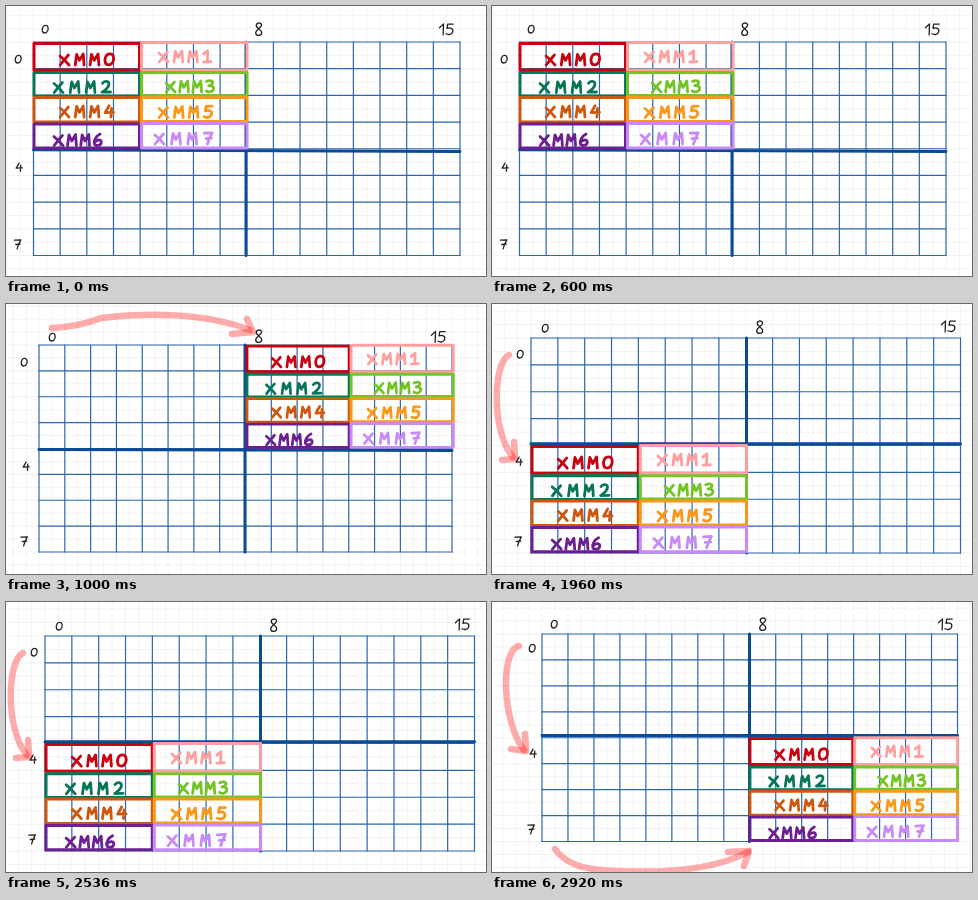
These frames come from a looping animation (480 px wide and 270 px high, 3.88 s). An HTML page with a canvas:

```html
<!DOCTYPE html>
<html lang="en">
<head>
<meta charset="utf-8">
<title>Register tiles on a 16 by 8 grid</title>
<style>
html, body { margin: 0; width: 100%; height: 100%; overflow: hidden; background: #fff; }
canvas { display: block; width: 480px; height: 270px; }
</style>
</head>
<body>
<canvas id="stage" width="480" height="270" role="img" aria-label="Registers XMM0 to XMM7 covering each quarter of a 16 by 8 grid"></canvas>
<script>
const ctx = document.getElementById('stage').getContext('2d');
const LOOP = 3880;
const CELL = 26.65;

// Pen strokes, each in a box about 9 wide and 12 high; I is a 1 without a foot
const GLYPHS = {
  x: 'M0 3 Q4.5 6.5 9 12 M8.4 2 Q4 7 0.2 12',
  M: 'M0.4 12 L1.8 1.4 L4.6 7.4 L8.4 1 L9.2 12',
  0: 'M5.5 0.8 C1.5 0.8 0 5 0.6 8.5 C1.2 13 6.5 13 8.5 8.5 C10 4.5 8.8 0.8 5.5 0.8',
  1: 'M1 4 L5.2 0.8 L4.8 11.6 M1.2 12 L8.6 11.6',
  I: 'M1.2 4.6 L5.6 0.4 L5.2 12.4',
  2: 'M1 2.8 C2.5 0 8 0 7.4 4 C7 7 4 9.5 0.6 11.7 L9 11.5',
  3: 'M1 1.4 C4 0 8 0.6 7 3.2 C6.4 4.8 4.5 5.4 3.2 5.6 C7 5.4 9 7.5 7.6 10 C6.2 12.4 3 12.4 0.8 11',
  4: 'M4.6 0.6 L0.6 7.6 L9 7.3 M7 3.4 L6.4 12',
  5: 'M8.6 0.6 L2.6 0.8 L1.8 5.4 C5.2 4 8.8 5.4 8 8.8 C7.2 12.2 3.4 12.6 0.6 11.2',
  6: 'M6.6 0.6 C2.6 2.6 0 7 0.8 10 C1.8 13 7.4 12.4 7.8 9 C8 6 4 5.4 1.2 8.6',
  7: 'M0.6 1.2 L8.6 0.8 C6.8 4.2 5 8 4 12 M2.4 6.6 L8 6.2',
  8: 'M7 2 C5.4 -0.6 1.6 0.4 2 3.2 C2.6 5.6 7 6.6 7 9.4 C6.8 12.6 1.6 12.8 1.4 9.6 C1.4 6.6 7 5 7 2'
};
for (const k in GLYPHS) GLYPHS[k] = new Path2D(GLYPHS[k]);

// Tiles: colour, top, bottom, label x, label y, label width
const TILES = [
  ['#c9000f', 1.5, 28, 27, 11, 54],
  ['#ff9f9f', 0.5, 28, 126, 8, 53],
  ['#08755a', 30.5, 54, 21, 38.5, 57],
  ['#73c526', 30.5, 53.5, 133, 38, 49],
  ['#cf570d', 55.5, 80, 27, 63, 54],
  ['#fa981c', 55.5, 79.5, 126, 63.5, 54],
  ['#6c1f90', 82, 106, 21, 91.5, 49],
  ['#c78af8', 81.5, 106, 122, 90, 58]
];

// Axis marks: text and size; each scene lists their centres in this order
const MARKS = [['0', 0.68], ['8', 1.08], ['I5', 0.92], ['0', 0.68], ['4', 0.72], ['7', 0.8]];

// grid: left, top, right, bottom; mid: x, y at left, y at right; origin: tile corner
const SCENES = [
  { from: 0, grid: [27.5, 36, 454, 249.5], mid: [240, 143.8, 145.4], origin: [27, 36],
    marks: [[39, 23], [253, 23], [440, 23], [12, 53], [13, 161], [11.5, 238]], arrows: [] },
  { from: 1000, grid: [33, 41, 446, 248], mid: [239, 145.4, 146.6], origin: [240, 40.7],
    marks: [[46, 33], [253, 32], [432, 32.5], [18, 58], [20, 162], [18, 237]],
    arrows: ['M46 24 C65 23 80 20 95 14 C140 8 200 9 244 26', 'M241 15 L247 28 L226 30'] },
  { from: 1960, grid: [39, 34, 468.5, 249], mid: [254.5, 139.7, 139.7], origin: [39, 141],
    marks: [[53, 24], [268, 23], [456, 22], [28, 50], [27, 157], [26, 237]],
    arrows: ['M17 51 C1 58 -1 128 21 153', 'M22 138 L23 155 L10 156'] },
  { from: 2920, grid: [50, 32, 465.5, 239.5], mid: [257.5, 133.4, 133.6], origin: [257, 135.2],
    marks: [[62, 22], [271, 22], [453, 22], [40, 46], [41, 151], [39, 227]],
    arrows: ['M27 44 C8 48 10 120 32 148', 'M33 132 L34 149 L19 147',
             'M63 247 C75 264 95 268 125 269 C170 271 220 269 256 250', 'M236 250 L257 249 L252 264'] }
];

function line(x1, y1, x2, y2, color, width) {
  ctx.strokeStyle = color;
  ctx.lineWidth = width;
  ctx.beginPath();
  ctx.moveTo(x1, y1);
  ctx.lineTo(x2, y2);
  ctx.stroke();
}

function write(text, x, y, step, size, color, width) {
  ctx.strokeStyle = color;
  [...text].forEach((ch, i) => {
    ctx.save();
    ctx.translate(x + i * step, y);
    ctx.scale(size, size);
    ctx.lineWidth = width / size;
    ctx.stroke(GLYPHS[ch]);
    ctx.restore();
  });
}

function drawPaper(x0, y0, dx, dy) {
  for (let x = x0 % dx; x < 480; x += dx) line(x, 0, x, 270, '#f3f3f3', 1);
  for (let y = y0 % dy; y < 270; y += dy) line(0, y, 480, y, '#f3f3f3', 1);
}

function drawGrid(s) {
  const [l, t, r, b] = s.grid;
  const dx = (r - l) / 16, dy = (b - t) / 8;
  drawPaper(l, t, dx / 2, dy / 2);
  for (let i = 0; i <= 16; i++) line(l + i * dx, t, l + i * dx, b, '#2a68b2', 1.2);
  for (let i = 0; i <= 8; i++) line(l, t + i * dy, r, t + i * dy, '#2a68b2', 1.2);
  const [mx, my1, my2] = s.mid;
  line(mx, t, mx, b, '#0b4a94', 3);
  line(l, my1, r, my2, '#0b4a94', 3);
}

function drawTiles(s) {
  const k = (s.grid[2] - s.grid[0]) / 16 / CELL;
  ctx.save();
  ctx.translate(...s.origin);
  ctx.scale(k, k);
  TILES.forEach(([color, top, bottom, x, y, w], i) => {
    ctx.strokeStyle = color;
    ctx.lineWidth = 3;
    ctx.strokeRect(i % 2 ? 108.5 : 1, top, 105.5, bottom - top);
    write('xMM' + i, x, y, (w - 9.5) / 3, 1, color, 2.8);
  });
  ctx.restore();
}

function drawArrows(s) {
  ctx.save();
  ctx.globalCompositeOperation = 'multiply';
  ctx.strokeStyle = '#ffacac';
  ctx.lineWidth = 6.5;
  s.arrows.forEach(a => ctx.stroke(new Path2D(a)));
  ctx.restore();
}

function drawMarks(s) {
  s.marks.forEach(([x, y], i) => {
    const [text, size] = MARKS[i];
    const step = 7;
    const width = (text.length - 1) * step + 9 * size;
    write(text, x - width / 2, y - 6 * size, step, size, '#222', 1.3);
  });
}

function draw(s) {
  ctx.fillStyle = '#fff';
  ctx.fillRect(0, 0, 480, 270);
  ctx.lineCap = ctx.lineJoin = 'round';
  drawGrid(s);
  drawTiles(s);
  drawArrows(s);
  drawMarks(s);
}

const start = performance.now();
function tick() {
  const t = (performance.now() - start) % LOOP;
  draw(SCENES.filter(s => s.from <= t).pop());
  requestAnimationFrame(tick);
}
tick();
</script>
</body>
</html>
```
